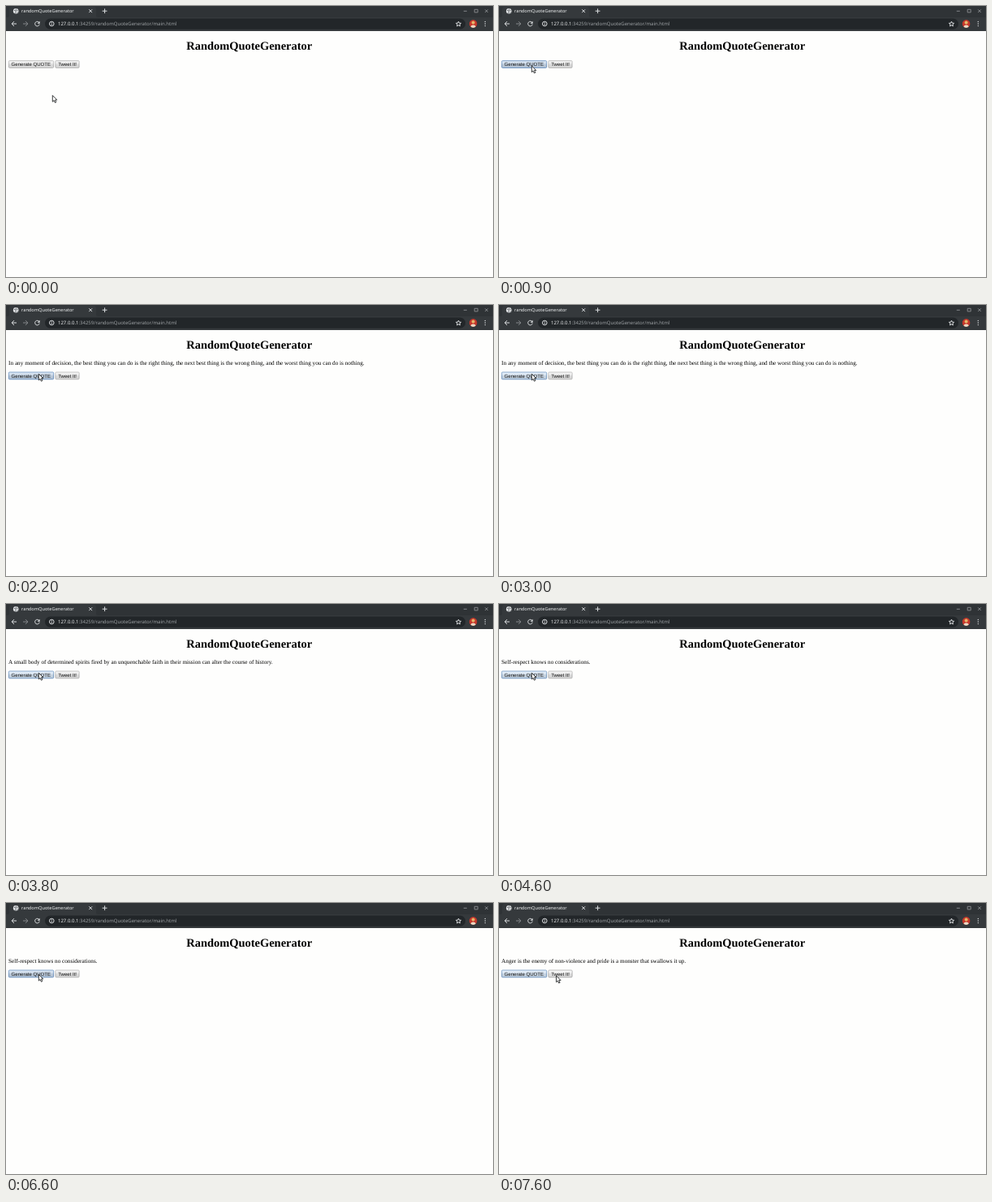
Animation, 600 px wide and 335 px high, one loop 8000 ms. Source, as an HTML page:

```html
<!DOCTYPE html>
<html lang="en">
<head>
<meta charset="utf-8">
<title>randomQuoteGenerator</title>
<style>
  html, body { margin: 0; width: 100%; height: 100%; overflow: hidden; background: #fefefd; }
  svg { display: block; width: 600px; height: 335px; }
  text { text-rendering: geometricPrecision; }
  .ui { font-family: "Noto Sans", "Open Sans", sans-serif; }
  .page { font-family: "Liberation Serif", "Times New Roman", serif; font-size: 7.23px; }
  .label { font-family: "Liberation Sans", Arial, sans-serif; font-size: 6.06px; }
  .icon { fill: none; stroke: #e4e6e8; stroke-width: .95; }
  .dim { stroke: #878b8e; }
</style>
</head>
<body>
<svg viewBox="0 0 600 335">
  <defs>
    <linearGradient id="shade" x2="0" y2="1">
      <stop offset=".3" stop-color="#fff" stop-opacity=".3"/>
      <stop offset="1" stop-color="#000" stop-opacity=".05"/>
    </linearGradient>
    <clipPath id="disc"><circle cx="575.6" cy="22" r="5"/></clipPath>
  </defs>

  <rect width="600" height="335" fill="#fefefd"/>

  <!-- browser chrome -->
  <rect width="600" height="31" fill="#2f3336"/>
  <path d="M0 14H2Q4 14 4 11V4Q4 1 7 1H108Q111 1 111 4V11Q111 14 113 14H600V31H0Z" fill="#35393c"/>
  <rect x="48" y="15.5" width="518" height="13.2" rx="6.6" fill="#222629"/>

  <circle cx="12.2" cy="6.3" r="3.3" fill="#e6e8ea"/>
  <path d="M9.8 5.2l2 .6 .4 1.5 -1 1.6M12.6 3.5l-.6 1.2 1.8 .9 1 -.6M13.4 8.5l1.1 -1.2" fill="none" stroke="#464b4f" stroke-width=".8"/>
  <text class="ui" x="19" y="8.4" font-size="5.65" fill="#eef0f1">randomQuoteGenerator</text>
  <path class="icon" d="M102.3 4.3l3.8 3.8m0-3.8l-3.8 3.8M118.7 6.2h5.8M121.6 3.3v5.8"/>
  <path class="icon dim" d="M563.8 6.3h4M577.2 4.3h4v3.6h-4zM590.2 4.4l3.6 3.6m0-3.6l-3.6 3.6" stroke-width=".7"/>

  <path class="icon" d="M13 22H7.2M10 19.1L7.1 22l2.9 2.9"/>
  <path class="icon dim" d="M21 22h5.8M24 19.1l2.9 2.9L24 24.9"/>
  <path class="icon" d="M40.8 20.5A2.8 2.8 0 1 0 41.2 22.7"/>
  <path d="M41.6 18.8v3h-3z" fill="#e4e6e8"/>
  <circle class="icon" cx="56.3" cy="22" r="2.8" stroke-width=".7"/>
  <path class="icon" d="M56.3 21.6v2M56.3 20.2v.8" stroke-width=".7"/>
  <text class="ui" x="64" y="24.1" font-size="6" fill="#9da1a4"><tspan fill="#eceeef">127.0.0.1</tspan>:34259/randomQuoteGenerator/main.html</text>
  <path class="icon" d="M557.5 19.1l.9 2 2.2.2-1.7 1.5.5 2.1-1.9-1.1-1.9 1.1.5-2.1-1.7-1.5 2.2-.2z" stroke-width=".7"/>
  <g clip-path="url(#disc)">
    <circle cx="575.6" cy="22" r="5" fill="#c5372b"/>
    <circle cx="575.6" cy="20.6" r="2" fill="#e5b467"/>
    <ellipse cx="575.6" cy="27" rx="3.2" ry="3.4" fill="#ead9c4"/>
  </g>
  <path d="M590.3 19.4v.01M590.3 22v.01M590.3 24.6v.01" stroke="#e4e6e8" stroke-width="1.4" stroke-linecap="round"/>

  <!-- page -->
  <text class="page" x="299.7" y="53.6" text-anchor="middle" style="font-size:14.46px;font-weight:bold">RandomQuoteGenerator</text>
  <text class="page" id="quote" x="3.1" y="73.8"></text>
  <g id="row">
    <g id="generate">
      <rect x="3.4" y="67.7" width="55.2" height="8.7" rx="1"/>
      <rect x="3.4" y="67.7" width="55.2" height="8.7" rx="1" fill="url(#shade)"/>
      <text class="label" x="6.6" y="74.2">Generate QUOTE</text>
    </g>
    <g id="tweet">
      <rect x="60.9" y="67.7" width="29.2" height="8.7" rx="1"/>
      <rect x="60.9" y="67.7" width="29.2" height="8.7" rx="1" fill="url(#shade)"/>
      <text class="label" x="64.2" y="74.2">Tweet It!</text>
    </g>
  </g>
  <path id="cursor" d="M0 0V7.8L1.8 6.2 3.1 9 4.5 8.4 3.2 5.6H5.5Z" fill="#fff" stroke="#17191b" stroke-width=".85" stroke-linejoin="round"/>
</svg>
<script>
const LOOP = 8000, TICK = 100, DROP = 15.4;
const $ = id => document.getElementById(id);

const quotes = [
  [0, ""],
  [1000, "The best way to find yourself is to lose yourself in the service of others."],
  [2200, "In any moment of decision, the best thing you can do is the right thing, the next best thing is the wrong thing, and the worst thing you can do is nothing."],
  [3100, "Self-respect knows no considerations."],
  [3700, "A small body of determined spirits fired by an unquenchable faith in their mission can alter the course of history."],
  [4500, "Self-respect knows no considerations."],
  [6700, "Anger is the enemy of non-violence and pride is a monster that swallows it up."]
];

// fill, border, text
const looks = {
  idle: ["#ebebeb", "#a9a9a9", "#111"],
  hover: ["#f1f1f1", "#989898", "#111"],
  press: ["#c3d5e9", "#4b7bb4", "#111"],
  marked: ["#9fc1ee", "#4474b8", "#23456f"],
  focus: ["#d3e3f3", "#507fb3", "#111"]
};
const generateLook = [
  [0, "idle"], [400, "hover"], [900, "press"], [1000, "marked"], [1700, "focus"],
  [2100, "press"], [2300, "focus"], [2900, "focus"], [3100, "press"], [3200, "focus"],
  [3500, "press"], [3700, "focus"], [4400, "press"], [4600, "focus"],
  [6600, "press"], [6800, "focus"]
];
const tweetLook = [[0, "idle"], [5700, "hover"], [6100, "idle"], [7400, "hover"]];

// time, x, y of the pointer tip
const path = [
  [0, 57.3, 110.5], [500, 40.3, 74], [1300, 40.3, 74], [1800, 40.3, 85.2],
  [5100, 40.3, 85.2], [5600, 55, 83.2], [5800, 66, 84], [6000, 62, 85],
  [6300, 40.3, 88.3], [7100, 40.3, 88.3], [7600, 70.6, 90], [LOOP, 70.6, 90]
];

const latest = (list, t) => list.filter(step => step[0] <= t).pop()[1];

function pointer(t) {
  const i = path.findIndex(p => p[0] > t);
  const [t0, x0, y0] = path[i - 1], [t1, x1, y1] = path[i];
  const k = (t - t0) / (t1 - t0), ease = k * k * (3 - 2 * k);
  return [x0 + (x1 - x0) * ease, y0 + (y1 - y0) * ease];
}

function paint(id, look) {
  const [fill, border, ink] = looks[look], box = $(id).firstElementChild;
  box.setAttribute("fill", fill);
  box.setAttribute("stroke", border);
  box.setAttribute("stroke-width", .75);
  $(id).lastElementChild.setAttribute("fill", ink);
}

function draw() {
  const t = Math.floor(performance.now() % LOOP / TICK) * TICK;
  const quote = latest(quotes, t);
  $("quote").textContent = quote;
  $("row").setAttribute("transform", `translate(0 ${quote ? DROP : 0})`);
  paint("generate", latest(generateLook, t));
  paint("tweet", latest(tweetLook, t));
  $("cursor").setAttribute("transform", `translate(${pointer(t)})`);
  requestAnimationFrame(draw);
}
draw();
</script>
</body>
</html>
```
